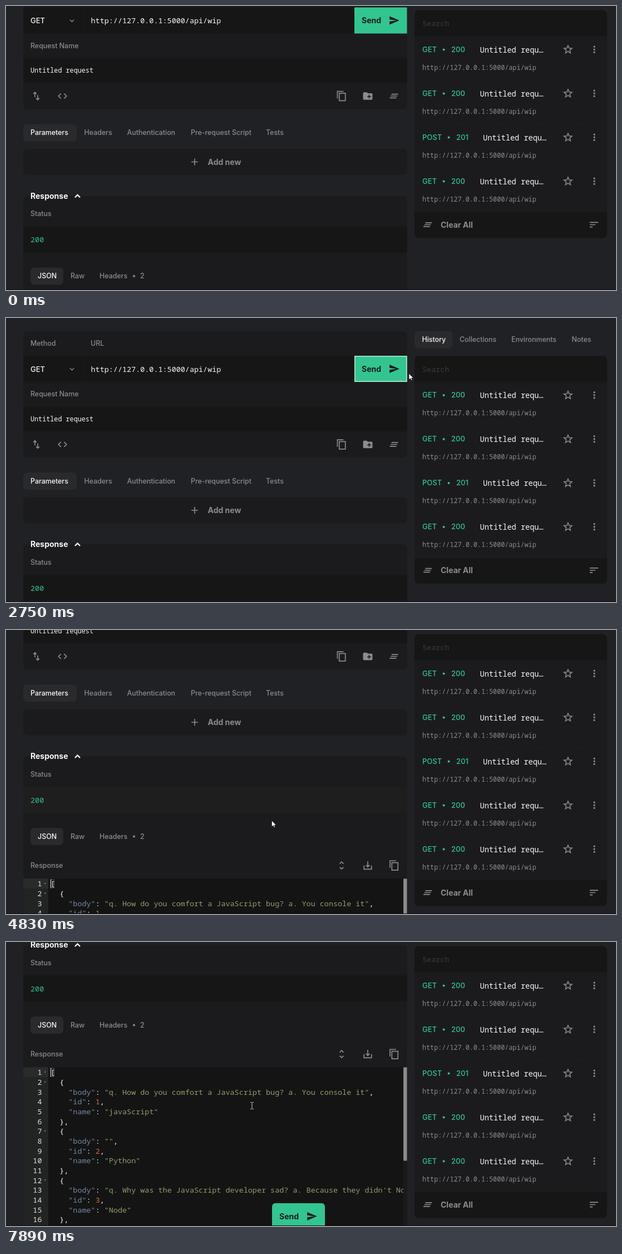
Animation of 1096x511 px, one loop 8 s. Source, as an HTML page:

```html
<!DOCTYPE html>
<html lang="en">
<head>
<meta charset="utf-8">
<title>API request client</title>
<style>
  html, body { margin: 0; width: 100%; height: 100%; overflow: hidden; background: #202125; }
  svg { display: block; width: 1096px; height: 511px; }
  text { font-family: Inter, "Open Sans", sans-serif; font-weight: 550; }
  .mono { font-family: "Roboto Mono", "Noto Sans Mono", "DejaVu Sans Mono", monospace; font-weight: 450; }
  .bold { font-weight: 700; }
</style>
</head>
<body>
<svg id="stage" viewBox="0 0 1096 511"></svg>
<script>
const LOOP = 8000;
const C = {
  card: '#1b1b1d', field: '#161617', active: '#2a2a2d', gray: '#8c8c8e', dim: '#3b3b3d',
  white: '#f8f8f8', green: '#33c58f', dark: '#1b1c1e'
};
const LABEL = 12.4, TITLE = 14, MONO = 13.45, SMALL = 11.78;

// [path, stroke width]; width 0 means filled
const ICONS = {
  swap: ['M9 14V5M5.7 7.3L9 4l3.3 3.3M15 10v9M11.7 16.7L15 20l3.3-3.3', 2],
  code: ['M8.7 6.7L3.4 12l5.3 5.3M15.3 6.7l5.3 5.3-5.3 5.3', 2],
  copy: ['M16 2H3v15M7 6h13v16H7z', 2],
  folder: ['M20 6h-8l-2-2H4q-2 0-2 2v12q0 2 2 2h16q2 0 2-2V8q0-2-2-2zm-1 8h-3v3h-2v-3h-3v-2h3V9h2v3h3z', 0],
  clear: ['M7 8h14M5 12h14M3 16h14', 2],
  sort: ['M3 7h18M3 12h12M3 17h6', 2],
  send: ['M2 21L23 12 2 3v7l15 2-15 2z', 0],
  close: ['M6 6l12 12M18 6L6 18', 2],
  plus: ['M12 5v14M5 12h14', 2],
  down: ['M7 9.5l5 5 5-5', 2],
  up: ['M6.5 15l5.5-5.5 5.5 5.5', 2.6],
  unfold: ['M8 8.3l4-4 4 4M8 15.7l4 4 4-4', 2],
  save: ['M4 12v8h16v-8M12 3v12M8 11l4 4 4-4', 2],
  more: ['M12 4a2 2 0 1 1 0 4 2 2 0 1 1 0-4m0 6a2 2 0 1 1 0 4 2 2 0 1 1 0-4m0 6a2 2 0 1 1 0 4 2 2 0 1 1 0-4', 0],
  star: [starPath(), 1.8]
};

const POINTERS = {
  arrow: '<path d="M0 0v11l2.6-2.4 1.7 3.7 1.7-.8-1.7-3.5h3.5z" fill="#fff" stroke="#111" stroke-width=".6"/>',
  hand: '<path d="M4 1.2q1-1.4 2 0v4.3l3.6.8q1.6.4 1.4 2l-.6 3.2-1.2 3H4.6L1 10q-.6-1.4.8-1.5L4 9.5z" fill="#fff" stroke="#111" stroke-width=".6"/>',
  beam: '<path d="M-3-6h2l1 1 1-1h2M0-5V5M-3 6h2l1-1 1 1h2" fill="none" stroke="#d0d0d0"/>'
};

const JSON_LINES = [
  '[', '  {', '    "body": "q. How do you comfort a JavaScript bug? a. You console it",',
  '    "id": 1,', '    "name": "javaScript"', '  },',
  '  {', '    "body": "",', '    "id": 2,', '    "name": "Python"', '  },',
  '  {', '    "body": "q. Why was the JavaScript developer sad? a. Because they didn\'t Node how to Express",',
  '    "id": 3,', '    "name": "Node"', '  },'
];

// Each step keeps the previous state and changes only what it lists.
const STEPS = [
  [0, { scroll: 65.5, dx: 0, focus: '', button: 'Send', status: '200', glow: 0, rows: 4, float: false, pointer: null }],
  [680, { pointer: ['arrow', 610, 394] }],
  [1030, { pointer: ['arrow', 348, 139] }],
  [1380, { pointer: ['beam', 229, 106.5], focus: 'name' }],
  [1710, { scroll: 3.5 }],
  [2080, { scroll: 0 }],
  [2410, { focus: 'url' }],
  [2750, { focus: 'send', pointer: ['arrow', 724, 100] }],
  [3100, { focus: 'hover', pointer: ['hand', 692, 94] }],
  [3430, { pointer: ['hand', 690, 92] }],
  [3790, { scroll: -3.5, dx: 3.5, button: 'Cancel', status: 'Fetching...' }],
  [4150, { status: '200', glow: 1 }],
  [4470, { scroll: 112.4, dx: 0, button: 'Send', focus: 'send', rows: 5, pointer: ['hand', 523, 319] }],
  [4830, { scroll: 180, glow: .4, pointer: ['arrow', 477.5, 343] }],
  [5180, { scroll: 245, glow: 0 }],
  [5500, { scroll: 282 }],
  [5870, { scroll: 388, float: true, pointer: ['beam', 478, 343] }],
  [6190, { scroll: 402 }],
  [7220, { pointer: ['beam', 158, 298] }],
  [7560, { pointer: ['beam', 165, 470] }],
  [7890, { pointer: ['beam', 442, 294.5] }]
];

function starPath() {
  const pts = Array.from({ length: 10 }, (_, i) => {
    const r = i % 2 ? 3.9 : 9, a = Math.PI * (i / 5 - .5);
    return (12 + r * Math.cos(a)).toFixed(2) + ' ' + (12.4 + r * Math.sin(a)).toFixed(2);
  });
  return 'M' + pts.join('L') + 'z';
}

// y is the vertical middle of the capitals
const text = (x, y, str, size = LABEL, fill = C.gray, cls = '') =>
  `<text x="${x}" y="${y + size * .36}" font-size="${size}" fill="${fill}" class="${cls}">${str}</text>`;
const mono = (x, y, str, size = MONO, fill = C.white) => text(x, y, str, size, fill, 'mono');
const bold = (x, y, str, fill = C.gray) => text(x, y, str, TITLE, fill, 'bold');
const rect = (x, y, w, h, fill, r = 0) =>
  `<rect x="${x}" y="${y}" width="${w}" height="${h}" rx="${r}" fill="${fill}"/>`;
const frame = (x, y, w, h, color, lw = 2) =>
  `<rect x="${x + lw / 2}" y="${y + lw / 2}" width="${w - lw}" height="${h - lw}" fill="none" stroke="${color}" stroke-width="${lw}"/>`;
const dot = (x, y, fill) => `<circle cx="${x}" cy="${y}" r="2" fill="${fill}"/>`;
const shift = (x, y, body) => `<g transform="translate(${x} ${y})">${body}</g>`;

function icon(name, cx, cy, fill = C.gray, size = 20.2) {
  const [d, lw] = ICONS[name], k = size / 24;
  const paint = lw ? `fill="none" stroke="${fill}" stroke-width="${lw}"` : `fill="${fill}"`;
  return `<path transform="translate(${cx - size / 2} ${cy - size / 2}) scale(${k})" d="${d}" ${paint}/>`;
}

function requestCard(s) {
  const cancel = s.button === 'Cancel', bx = cancel ? 611.5 : 626, bw = 720.5 - bx;
  let out = rect(31, 24, 689.5, 227, C.card, 8) +
    text(44, 45.5, 'Method') + text(152, 45.5, 'URL') +
    rect(31, 68, 689.5, 47, C.field) + rect(138, 68, 1, 47, C.card) +
    text(44, 92, 'GET', 13, C.white) + icon('down', 118.5, 92, C.gray, 17) +
    mono(152.5, 92, 'http://127.0.0.1:5000/api/wip') +
    rect(bx, 68, bw, 47, C.green) + bold(bx + 13, 91.5, s.button, C.dark) +
    icon(cancel ? 'close' : 'send', 697.5, 91.5, C.dark) +
    text(44, 137, 'Request Name') + rect(31, 160, 689.5, 44, C.field) +
    mono(44, 181.5, 'Untitled request', SMALL);
  [['swap', 54.5], ['code', 101.5], ['copy', 603], ['folder', 650], ['clear', 697]]
    .forEach(([n, x]) => out += icon(n, x, 227.5));
  if (s.focus === 'name') out += frame(31, 160, 689.5, 44.5, '#919193');
  if (s.focus === 'url') out += frame(139, 68, 487, 47, '#919193');
  if (s.focus === 'send') out += frame(bx, 68, bw, 47, '#c6eddd', 1.4);
  if (s.focus === 'hover') out += frame(bx, 68, bw, 47, '#f0f8f5');
  return out;
}

function parameters() {
  let out = rect(31, 278, 96, 31, C.active, 7) + text(44, 293.5, 'Parameters', LABEL, C.white);
  [['Headers', 140.5], ['Authentication', 217.5], ['Pre-request Script', 332], ['Tests', 467]]
    .forEach(([label, x]) => out += text(x, 293.5, label));
  return out + rect(31, 322.5, 689.5, 47, C.card, 8) +
    icon('plus', 339, 346) + bold(362.5, 346, 'Add new');
}

function paintJson(str) {
  return str.replace(/"\w+"(?=:)|"[^"]*"?|\d+/g, (m, at, all) => {
    const key = all[at + m.length] === ':';
    const fill = m[0] !== '"' ? '#cf6a4c' : key ? '#7587a6' : '#8f9d6a';
    return `<tspan fill="${fill}">${m}</tspan>`;
  });
}

function editor() {
  let code = '', gutter = rect(31, 627, 45, 310, '#222323') + rect(31, 627.5, 45, 17.6, '#292a2a');
  JSON_LINES.forEach((line, i) => {
    const y = 636.5 + i * 17.67, body = line.trimStart();
    const x = 80 + (line.length - body.length) * MONO * .6;
    const n = String(i + 1);
    gutter += mono(64.5 - n.length * MONO * .6, y, n, MONO, '#e2e2e2');
    if (/[[{]$/.test(line)) gutter += `<path d="M68 ${y - 1.5}h4.4l-2.2 2.8z" fill="#666"/>`;
    code += mono(x, y, paintJson(body), MONO, '#f8f8f8');
  });
  return rect(31, 627, 689.5, 310, '#141414') + gutter + frame(79, 628.5, 8, 16, '#505050', 1) +
    rect(80, 628.5, 1.4, 16, '#a7a7a7') +
    `<g clip-path="url(#codeClip)">${code}</g>` +
    rect(714, 627, 6.5, 310, '#1a1a1a') + rect(714, 627.5, 6.5, 168, '#8a8a8a');
}

function response(s) {
  const row = s.glow === 1 ? '#28282a' : s.glow ? '#1e1e1f' : C.field;
  let out = rect(31, 407.5, 689.5, 600, C.card, 8) + bold(44, 407, 'Response', C.white) +
    icon('up', 128.5, 407.5, C.white) + text(44, 439.5, 'Status') +
    rect(31, 462.3, 689.5, 46.7, row) +
    mono(44, 486, s.status, MONO, s.glow === 1 ? C.white : C.green) +
    rect(44, 536, 59, 31, C.active, 7) + text(57, 551.3, 'JSON', LABEL, C.white) +
    text(116, 551.3, 'Raw') + text(168, 551.3, 'Headers') + dot(230, 551.5, C.gray) + text(241, 551.3, '2') +
    text(44, 603.7, 'Response');
  [['unfold', 603], ['save', 650], ['copy', 697.5]].forEach(([n, x]) => out += icon(n, x, 603.7));
  return out + editor();
}

function historyRow(i) {
  const post = i === 2, y = 138.7 + i * 79, push = post ? 9 : 0;
  return text(748, y, post ? 'POST' : 'GET', 13, C.green) + dot(786.5 + push, y + .3, C.green) +
    text(800 + push, y, post ? '201' : '200', 13, C.green) +
    mono(post ? 857 : 851.5, y + .5, 'Untitled requ…', 13.6) +
    icon('star', 1009.8, y) + icon('more', 1057, y) +
    mono(748, y + 32.3, 'http://127.0.0.1:5000/api/wip', SMALL, C.gray) +
    `<path d="M734 ${y + 55}h346" stroke="#28282b" stroke-dasharray="1 2"/>`;
}

function sidebar(s) {
  const end = 115 + s.rows * 79;
  let out = rect(734, 23.5, 68, 31, C.active, 7) + text(747.5, 39, 'History', LABEL, C.white);
  [['Collections', 815], ['Environments', 908], ['Notes', 1016.5]]
    .forEach(([label, x]) => out += text(x, 39, label));
  out += rect(734, 68, 346, end - 21, C.field, 8) + rect(734, 115, 346, end - 115, C.card) +
    mono(748, 92, 'Search', MONO, C.dim);
  for (let i = 0; i < s.rows; i++) out += historyRow(i);
  return out + icon('clear', 757.5, end + 23) + bold(781, end + 23, 'Clear All') +
    icon('sort', 1056.5, end + 23);
}

function scene(s) {
  let out = '<defs><clipPath id="codeClip"><path d="M76 627h638v310H76z"/></clipPath></defs>' +
    rect(0, 0, 1096, 511, '#202125') +
    shift(s.dx, -s.scroll, requestCard(s) + parameters() + response(s)) +
    shift(s.dx, -Math.min(s.scroll, 60.5), sidebar(s));
  if (s.dx) out += rect(592, 0, 280, 1, '#151518');
  if (s.float) out += rect(478, 470, 95, 60, C.green, 6) +
    bold(491, 493.5, 'Send', C.dark) + icon('send', 549.5, 493.5, C.dark);
  out += rect(0, 510, 1096, 1, '#120e13');
  if (s.pointer) out += shift(s.pointer[1], s.pointer[2], POINTERS[s.pointer[0]]);
  return out;
}

const states = [];
STEPS.forEach(([, change], i) => states.push({ ...states[i - 1], ...change }));

const stage = document.getElementById('stage');
const start = performance.now();
let shown = -1;

function tick() {
  const t = (performance.now() - start) % LOOP;
  let step = STEPS.length - 1;
  while (STEPS[step][0] > t) step--;
  if (step !== shown) stage.innerHTML = scene(states[shown = step]);
  requestAnimationFrame(tick);
}
tick();
</script>
</body>
</html>
```
